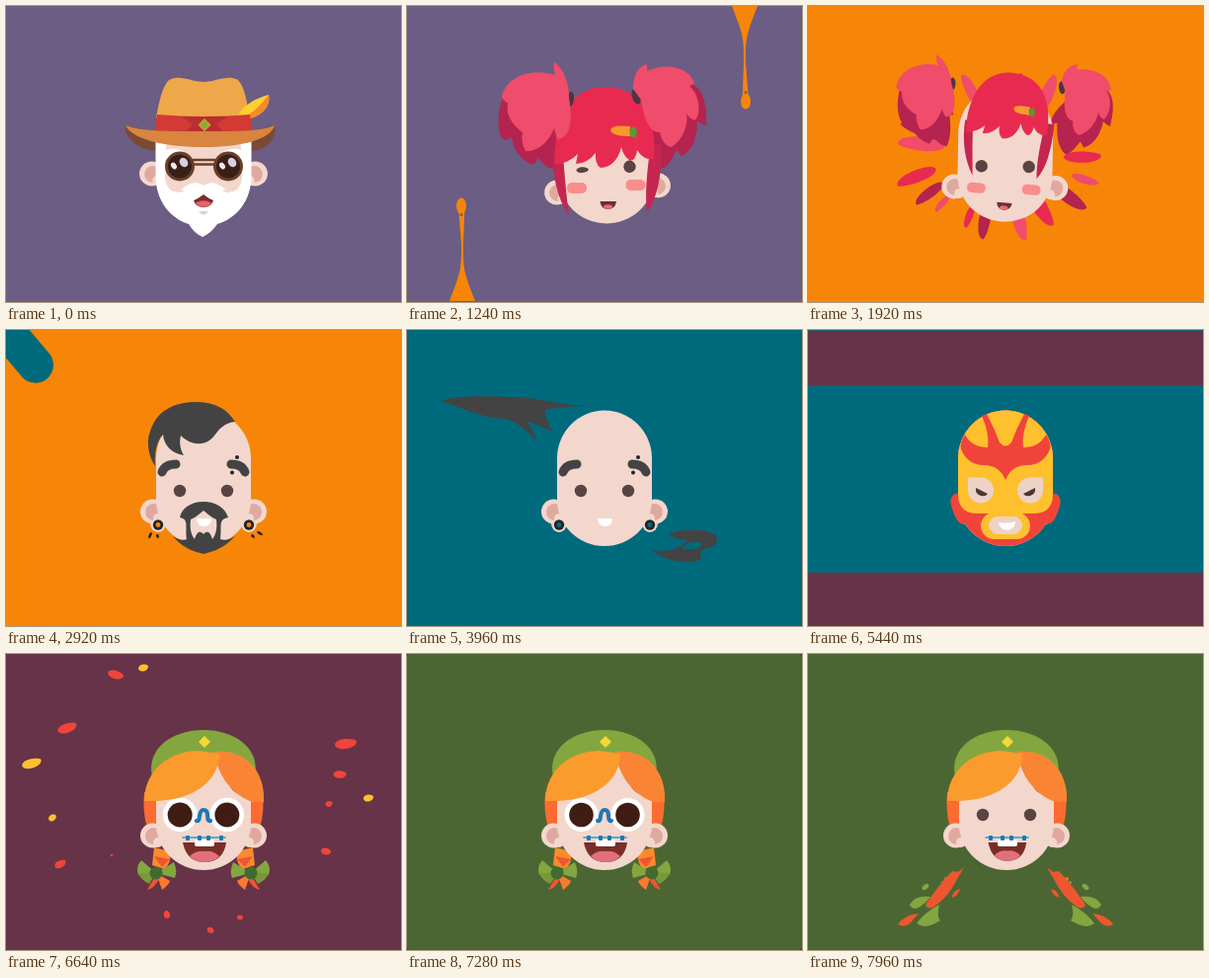
Animation, 400 px wide and 300 px high, one loop 8 s. Source, as an HTML page:

```html
<!DOCTYPE html>
<html lang="en">
<head>
<meta charset="utf-8">
<title>Faces</title>
<style>
html, body { margin: 0; width: 100%; height: 100%; overflow: hidden; background: #6b5d83; }
svg { display: block; width: 100vw; height: 100vh; }
</style>
</head>
<body>
<svg id="stage" viewBox="0 0 400 300"></svg>
<script>
const LOOP = 8000;
const stage = document.getElementById('stage');
const C = {
  purple: '#6b5d83', orange: '#f78508', teal: '#006a7d', maroon: '#663348', green: '#4c6633',
  skin: '#f3d7cd', ear: '#e0a9a0', eye: '#594343', hair: '#434343'
};

// Easing
const clamp = k => Math.max(0, Math.min(1, k));
const span = (t, a, b) => clamp((t - a) / (b - a));
const easeOut = k => 1 - (1 - k) ** 3;
const smooth = k => k * k * (3 - 2 * k);
const back = k => 1 + 2.4 * (k - 1) ** 3 + 1.4 * (k - 1) ** 2;
function keyed(t, keys) {
  let i = 1;
  while (i < keys.length - 1 && t > keys[i][0]) i++;
  const [a, u] = keys[i - 1], [b, v] = keys[i];
  return u + (v - u) * smooth(span(t, a, b));
}

// Markup helpers
const path = (d, fill, more = '') => `<path d="${d}" fill="${fill}" ${more}/>`;
const oval = (x, y, rx, ry, fill, more = '') =>
  `<ellipse cx="${x}" cy="${y}" rx="${rx}" ry="${ry}" fill="${fill}" ${more}/>`;
const dot = (x, y, r, fill, more) => oval(x, y, r, r, fill, more);
const box = (x, y, w, h, r, fill) => `<rect x="${x}" y="${y}" width="${w}" height="${h}" rx="${r}" fill="${fill}"/>`;
const line = (d, color, w) => path(d, 'none', `stroke="${color}" stroke-width="${w}" stroke-linecap="round"`);
const flip = s => `<g transform="matrix(-1 0 0 1 400 0)">${s}</g>`;
const both = s => s + flip(s);
const tilted = s => `<g transform="rotate(4 200 155) translate(-1 -1.5)">${s}</g>`;
const headShape = 'M152 130A48 48.5 0 0 1 248 130V172A48 47 0 0 1 152 172Z';

function morph(a, b, k) {
  const to = b.match(/-?[\d.]+/g);
  let i = 0;
  return a.replace(/-?[\d.]+/g, n => (+n + (to[i++] - n) * k).toFixed(1));
}

const hairOn = 'M151 138C144 128 142 112 146 103C152 82 170 73 192 73C212 73 224 80 232 93C222 94 217 99 211 107C203 118 188 118 177 107C175 115 177 122 180 127C168 125 160 117 159 106C153 112 150 124 151 138Z';
const hairOff = 'M34 72C50 66 80 67 105 68C140 68 162 80 187 75C172 79 150 78 140 81C141 90 144 96 148 103C138 99 130 95 122 93C126 99 130 106 132 113C122 102 112 94 100 90C75 90 50 76 34 72Z';
const beardOn = 'M176 190C178 180 188 174 200 174C212 174 222 180 225 190C214 192 219 200 217 212C222 214 227 212 232 209C222 220 212 224 200 227C188 224 178 220 169 209C174 212 179 214 183 212C181 200 186 192 176 190ZM187 192C192 190 196 186 200 183C204 186 208 190 213 192C214 200 213 207 209 212C206 203 203 204 200 207C197 204 194 203 191 212C187 207 186 200 187 192Z';
const beardOff = 'M264 207C272 203 282 202 292 203C304 202 314 207 314 212C314 218 308 222 299 222C296 225 298 229 297 233C288 236 276 236 268 233C260 231 252 228 247 222C258 226 276 224 284 212C277 213 270 211 264 207ZM280 219C284 216 288 215 292 215C296 214 299 216 298 218C296 221 293 222 290 222C287 222 285 222 283 222C281 222 280 222 279 221C279 220 279 220 280 219Z';

// Parts: layer, start, end, anchor x/y, exit offset x/y, markup
const parts = [];
const part = (layer, from, to, x, y, dx, dy, svg) => parts.push({ layer, from, to, x, y, dx, dy, svg });

// Old man
part('back', -999, 120, 200, 130, -50, -100,
  path('M121 121C119 134 136 147 154 147H246C264 147 275 134 272 121Q200 140 121 121Z', '#7a4a36'));
part('front', -999, 140, 200, 200, 30, 110,
  path('M151.500 134H163C161 150 161 165 161 175C163 188 172 192 180 184C187 178 195 178 200 182C205 178 213 178 220 184C228 192 237 188 239 175C239 165 239 150 237 134H248.500V172C248.500 197 234 215 214 221Q208 230 199 234Q190 230 185 221C166 215 151.500 197 151.500 172Z', '#fff') +
  both(path('M156 154C157 144 172 142 182 149Q169 151 157 157Z', '#fff')) +
  both(line('M170 184Q172 190 179 187', C.skin, 2)) +
  path('M190 197Q195 195 200 191Q205 195 210 197Q208 204 200 204Q192 204 190 197Z', '#7a2e2a') +
  path('M192 199.500Q200 195 208 199.500Q206 203.500 200 203.500Q194 203.500 192 199.500Z', '#e8606a') +
  path('M195 208H205Q200 215 195 208Z', '#d5d3da'));
part('front', -999, 100, 200, 163, 110, 10,
  line('M189 156H212M190 160.5H211', '#6b3f2a', 2.7) +
  [176, 225].map(x => dot(x, 162.5, 15, '#6b3f2a') + dot(x, 162.5, 12, '#3a1f18') +
    oval(x + 4, 158.5, 4, 5, '#d8cfdd', `transform="rotate(-35 ${x + 4} 158.5)"`) +
    oval(x - 6, 162, 2.6, 3.6, '#eee8f0', `transform="rotate(-35 ${x - 6} 162)"`)).join(''));
part('front', -999, 120, 200, 120, -50, -100,
  path('M152 114C155 97 158 82 165 75C176 69 188 77 200 77C212 77 224 69 235 75C242 82 244 98 247 114Z', '#eea849') +
  path('M234 113C240 100 252 94 266 90C268 99 262 110 248 113Z', '#ffcf30') +
  path('M237 113C250 110 257 101 266 90C268 99 262 110 248 114Z', '#f58a2a') +
  path('M153 110Q200 114 247 110L250 129Q200 130 150 129Z', '#d23a33') +
  path('M178 112H224L213 120L222 129H180L189 120Z', '#b82e33') +
  path('M121 121C140 128 170 127 200 127C230 127 255 128 272 121C268 136 236 143 200 143C164 143 128 136 121 121Z', '#d9843f') +
  path('M201 114L207.500 120.500L201 127L194.500 120.500Z', '#c8a436') + path('M201 116L205.500 120.500L201 125L196.500 120.500Z', '#7fae35'));

// Pink-haired girl
part('back', 600, 1820, 163, 100, -110, -70, tilted(
  path('M98 90C90 110 92 128 97 135Q101 137 106 133C108 148 118 158 128 161L133 154Q140 164 148 165Q156 150 152 120Z', '#b5234f')));
part('back', 600, 1820, 233, 96, 110, -70, tilted(
  path('M286 78C300 82 304 100 303 121Q298 120 294 117C294 135 288 147 278 152L273 146C268 155 264 164 259 164Q244 158 240 118Z', '#b5234f')));
part('front', 560, 1860, 200, 185, 0, 60, tilted(
  box(162, 179, 20, 11, 5, '#f98d8d') + box(221.5, 176, 20, 11, 5, '#f98d8d') +
  path('M195.500 198H212Q211 206 203 206Q196 205 195.500 198Z', '#6b2f36') + oval(203.5, 203.5, 4.5, 2.2, '#ee6b66')));
part('front', 540, 1800, 200, 120, 10, -110, tilted(
  path('M148 145Q146 185 164 213Q160 180 158 150Z', '#c4264f') + path('M247 140Q240 185 243 209Q258 190 258 140Z', '#c4264f') +
  path('M150 160C148 110 168 82 200 82C234 82 254 108 250 155Q240 157 233 146Q232 156 226 157Q219 152 217 143Q212 163 196 164Q190 160 191 149Q182 160 171 160Q172 155 173 150Q163 160 150 160Z', '#e82a50') +
  path('M226 122Q206 120 206 126Q208 132 226 132Z', '#f9992c') + path('M225 125L230 122L233 126L232 134L226 132Z', '#5f9630')));
part('front', 620, 1800, 163, 95, -120, -60, tilted(
  oval(165, 95, 4, 8, '#4c3540', 'transform="rotate(10 165 95)"') +
  path('M149 57C158 62 165 80 164 93C168 115 166 133 153 135Q150 130 149 124C143 140 130 148 120 147Q115 138 117 128C106 120 100 110 102 98Q97 96 96 92C100 72 125 62 150 70Q148 62 149 57Z', '#f04c6b')));
part('front', 620, 1800, 233, 92, 120, -60, tilted(
  oval(232, 92, 4, 8, '#4c3540', 'transform="rotate(-20 232 92)"') +
  path('M229 84C229 70 234 61 243 59L243 66C265 56 288 64 291 79L286 81C298 92 297 110 292 116Q284 113 283 108C286 125 274 141 267 143Q258 140 256 128C244 128 240 112 237 95Z', '#f04c6b')));

// Pierced man
part('back', 2340, 4180, 200, 184, 0, 0, both(oval(154, 196, 8, 9, C.skin)));
part('front', 2340, 4180, 200, 160, 0, 40,
  both(line('M158 144Q161 136 172 136', C.hair, 9)) +
  path('M193 191H208Q208 199 200 199Q193 198 193 191Z', '#fff') +
  dot(234, 129, 2, '#222') + dot(229, 144.5, 2, '#222') +
  both(dot(154, 197.5, 5.2, '#252525') + dot(154, 197.5, 2.4, 'none', 'class="plug"')));
part('front', 2300, 9999, 190, 110, 0, 0, path(hairOn, C.hair, 'id="hair"'));
part('front', 2380, 9999, 200, 200, 0, 0, path(beardOn, C.hair, 'id="beard" fill-rule="evenodd"'));

// Wrestler
part('front', 4260, 5940, 200, 150, 0, 0,
  path(headShape, '#f0443a') +
  path('M153 166C146 164 143 172 145 178Q149 192 154 196H246Q251 192 255 178C257 172 254 164 247 166Z', '#f0443a') +
  path('M152 130A48 48.500 0 0 1 248 130V168Q247 186 228 186H172Q153 186 152 168Z', '#ffc02e') +
  box(175, 185, 50, 27, 13.5, '#ffc02e') +
  path('M159 106Q166 119 182 119Q184 105 176 87L181 85Q189 100 194 114Q200 121 206 114Q211 100 219 85L224 87Q216 105 218 119Q234 119 241 106Q247 115 245 121Q238 137 222 137Q206 137 200 152Q194 137 178 137Q162 137 155 121Q153 115 159 106Z', '#f0443a') +
  both(path('M162 149.500H175A13 13 0 1 1 162 162.500Z', '#ecd2c7') +
    path('M170 160L182 166Q180 169 175 168Q169 166 170 160Z', '#4f3535')) +
  box(183, 189, 34, 18, 9, '#ecd2c7') + path('M193 195Q201 197 210 194Q210 202 202 203Q194 202 193 195Z', '#fff'));

// Girl with braces
part('back', 6240, 7640, 154, 205, -20, 30,
  path('M150 196L166 200Q168 212 160 218L148 214Z', '#fb8a2d') + path('M150 205L166 208L158 216Z', '#ee5630') +
  path('M153 222L143 239Q150 238 155 228Z', '#ee5630') + path('M152 222L158 239Q165 234 166 230Z', '#fb7a2d') +
  path('M152 222L137 209Q131 216 134 224Z', '#83a63f') + path('M152 222L170 211Q174 220 171 227Z', '#83a63f') +
  path('M152 222L134 222Q136 229 145 233Z', '#78983a') + dot(152, 222, 6.5, '#3f6b30'));
const braid = parts[parts.length - 1];
parts.push({ ...braid, x: 246, dx: 20, svg: flip(braid.svg) });
part('back', 6140, 9999, 200, 110, 0, 0, both(path('M140 140H154V176H143Q138 160 140 140Z', '#fd6b30')));
part('front', 6180, 9999, 200, 195, 0, 0,
  both(path('M161 140Q164 130 172 128Q175 132 172 136Q166 144 161 140Z', '#d0332b')) +
  `<g id="mouth">${path('M179 191H223Q220 211 201 211Q183 211 179 191Z', '#7a2e2a')}
  ${path('M186 205Q192 199 201 200Q210 199 216 205Q210 211 201 211Q192 211 186 205Z', '#e2707a')}</g>` +
  box(191, 188, 20, 7, 2, '#fff') + line('M179 186H222', '#2a9bd0', 1.6) +
  [182, 194, 203, 216].map(x => box(x, 184, 4, 5, 1, '#1d77b8')).join(''));
part('front', 6340, 7360, 200, 163, 0, 0,
  both(dot(176.5, 163, 17, '#fff') + dot(176.5, 163, 12.3, '#3f1d14')) +
  line('M193 169Q196 170 196 164Q197 158 200 158Q204 158 204 164Q204 170 207 169', '#1d77b8', 4));
part('front', 6100, 9999, 200, 120, 0, 0,
  path('M148 124C142 96 168 77 200 77C232 77 258 96 252 124C240 93 160 93 148 124Z', '#83a63f') +
  path('M211 99C240 96 259 115 261 142V150H249C232 143 215 128 211 99Z', '#f98534') +
  path('M140 149C140 122 160 99 195 98L216 101C216 130 188 148 152 149Z', '#fb9a2d') +
  path('M201 83L207 89L201 95L195 89Z', '#f5d836'));

// Stage
const earSvg = both(dot(148.5, 184, 12.5, C.skin) + dot(149.5, 184.5, 8.5, C.ear) + dot(154, 191, 5, C.skin));
const tails =
  path('M158 216L152 221L146 220Q134 232 119 254Q121 260 128 256Q142 246 150 230Z', '#ee5630') +
  path('M154 238Q146 240 146 247Q152 245 154 238Z', '#ee5630') +
  path('M112 263Q98 264 91 274Q97 278 103 273Z', '#ee5630') +
  path('M124 246Q108 244 103 254Q106 260 112 257Q120 252 124 246Z', '#83a63f') +
  path('M133 254Q118 262 110 273Q118 280 134 270Q130 266 133 254Z', '#83a63f') +
  oval(119, 236, 4, 2.4, '#83a63f', 'transform="rotate(-40 119 236)"');
const layer = name => parts.map((p, i) => p.layer === name ? `<g id="p${i}">${p.svg}</g>` : '').join('');

stage.innerHTML = `<rect id="bg" width="400" height="300"/><g id="wipe"></g><g id="bits"></g>
<g id="head">${layer('back')}<g id="ears">${earSvg}</g>${path(headShape, C.skin)}
${oval(176, 163, 6.2, 6.2, C.eye, 'id="eyeL"')}${oval(224, 163, 6.2, 6.2, C.eye, 'id="eyeR"')}${layer('front')}</g>
<g class="tail">${tails}</g><g transform="matrix(-1 0 0 1 400 0)"><g class="tail">${tails}</g></g>`;

const $ = id => document.getElementById(id);
const set = (el, attrs) => { for (const k in attrs) el.setAttribute(k, attrs[k]); };
parts.forEach((p, i) => p.el = $('p' + i));
const [bg, wipe, bits, head, ears, hair, beard, mouth, eyeL, eyeR] =
  ['bg', 'wipe', 'bits', 'head', 'ears', 'hair', 'beard', 'mouth', 'eyeL', 'eyeR'].map($);
const tailEls = [...document.querySelectorAll('.tail')];
const plugs = [...document.querySelectorAll('.plug')];

// Background changes
const bgAt = t => t < 1700 ? C.purple : t < 3440 ? C.orange : t < 5715 ? C.teal : t < 7320 ? C.maroon : C.green;

function wipeAt(t) {
  if (t > 1060 && t < 1700) {
    const y = 105 * easeOut(span(t, 1060, 1240)), u = span(t, 1240, 1700) ** 2;
    const x = 342, w = 13 * span(t, 1060, 1200) + 390 * u, n = 1 + 250 * u, b = 5 + 190 * u;
    const e = y + 140 * u, cy = e - 8.5;
    const drip = path(`M${x - w} 0C${x - n} ${e * .3} ${x - n} ${e * .3} ${x - n} ${e * .55}L${x - n - 1.5} ${cy}H${x + n + 3}L${x + n} ${e * .55}C${x + n} ${e * .3} ${x + n} ${e * .3} ${x + w} 0Z`, C.orange) +
      oval(x + 1, cy, b, b * 1.6, C.orange) + dot(x + 1, cy - 9, 1.5 * (1 - clamp(u * 9)), '#8a5a40');
    return drip + `<g transform="rotate(180 199 149.500)">${drip}</g>`;
  }
  if (t > 2860 && t < 3440) {
    const k = span(t, 2860, 3440), p = k ** 1.38;
    return path('M-17 -20L270 320L110 -30L420 300L330 -30', 'none',
      `pathLength="1" stroke="${C.teal}" stroke-width="${36 + 330 * k ** 3}" stroke-linecap="round" stroke-linejoin="round" stroke-dasharray="${p} 2"`);
  }
  if (t > 5280 && t < 5715) {
    const h = 55 * ((t - 5280) / 160) ** 1.5;
    return box(0, 28.5 - h / 2, 400, h, 0, C.maroon) + box(0, 273.5 - h / 2, 400, h, 0, C.maroon);
  }
  if (t > 6920 && t < 7320) return dot(200, 150, 255 * smooth(span(t, 6920, 7320)), C.green);
  return '';
}

// Flying drops
const rand = n => { const s = Math.sin(n * 127.1 + 3.7) * 43758.545; return s - Math.floor(s); };
const drop = (x, y, r, stretch, turn, fill) => {
  const l = r * stretch;
  return path(`M${-l} ${r * .2}C${-l} ${-r} ${l * .6} ${-r * 1.1} ${l} ${-r * .5}C${l * 1.1} ${r * .9} ${-l * .8} ${r * 1.4} ${-l} ${r * .2}Z`,
    fill, `transform="translate(${x} ${y}) rotate(${turn})"`);
};
function burst(t, a, b, colors) {
  if (t <= a || t >= b) return '';
  const k = span(t, a, b), go = easeOut(k);
  let s = '';
  for (let i = 0; i < 20; i++) {
    const an = (i + rand(i + a) * .8) / 20 * 2 * Math.PI, d = 50 + (50 + 70 * rand(i * 3 + a)) * go;
    s += drop(200 + Math.cos(an) * d * 1.15, 150 + Math.sin(an) * d * .9, (3 + 6 * rand(i + 9)) * (1 - k ** 2),
      1.5 + 1.5 * (1 - k), an * 180 / Math.PI, colors[i % colors.length]);
  }
  return s;
}
// x, y, half length, turn, yellow
const shards = [
  [111, 21, 8, 25, 0], [139, 14, 5, 0, 1], [62, 75, 10, -12, 0], [26, 111, 10, -8, 1], [47, 166, 4, -10, 1],
  [55, 213, 6, -15, 0], [107, 204, 1.5, 0, 0], [163, 264, 4, -75, 0], [207, 280, 3.5, 60, 0], [237, 267, 3, 40, 0],
  [324, 200, 5, 25, 0], [327, 152, 3.5, 10, 0], [338, 122, 6.5, 10, 0], [344, 91, 11, 0, 0], [367, 146, 5, 5, 1]
];
function maskBits(t) {
  if (t < 5940 || t > 7120) return '';
  const k = .3 + .7 * easeOut(span(t, 5940, 6700)) / easeOut(700 / 760);
  const size = (1 + 2 * (1 - span(t, 5940, 6640))) * (1 - span(t, 6640, 7120));
  return shards.map(([x, y, l, a, gold]) => {
    const r = Math.min(l, 2.6 + l * .3);
    return drop(200 + (x - 200) * k, 150 + (y - 150) * k, r * size, l / r, a, gold ? '#ffc02e' : '#f0443a');
  }).join('');
}
function earDrops(t) {
  if (t < 2720 || t > 3060) return '';
  const k = (t - 2920) / 200, s = 1 - Math.abs(k) * .8;
  return [[146, 208, 3.4, 120], [153.5, 209, 2, 80], [250, 209, 2.2, 60], [257, 206, 3.2, 35]].map(([x, y, l, a]) =>
    drop(x + (x < 200 ? -6 : 6) * k, y + 6 * k, 1.6 * s, l / 1.6, a, '#252525')).join('');
}

function pose(p, t) {
  const on = t >= p.from && t < p.to + 380;
  p.el.style.display = on ? '' : 'none';
  if (!on) return;
  const enter = back(span(t, p.from, p.from + 340)), leave = span(t, p.to, p.to + 380) ** 1.5;
  const s = Math.max(0, enter) * (1 - leave), turn = leave * p.dx * .5;
  set(p.el, { transform: `translate(${p.x + p.dx * leave} ${p.y + p.dy * leave}) rotate(${turn}) scale(${s}) translate(${-p.x} ${-p.y})` });
}

function fling(el, t, on, off, x, y, dx, dy) {
  const end = span(t, 3960, 4230), s = 1 - end;
  set(el, {
    d: morph(on, off, easeOut(span(t, 3660, 3960))),
    transform: `translate(${x + dx * end} ${y + dy * end}) scale(${s}) translate(${-x} ${-y})`
  });
}

function draw(t) {
  const color = bgAt(t);
  set(bg, { fill: color });
  wipe.innerHTML = wipeAt(t);
  bits.innerHTML = burst(t, 160, 840, ['#eea849', '#fff', '#d23a33', '#7a4a36']) +
    burst(t, 1860, 2460, ['#e82a50', '#f04c6b', '#b5234f']) + maskBits(t) + earDrops(t);

  const tilt = keyed(t, [[0, 0], [560, 0], [900, -6], [1240, -4], [1600, 3], [2100, 0], [8000, 0]]);
  const lean = tilt / -4;
  set(head, { transform: `translate(${lean + span(t, 7400, 7700)} ${lean * 1.5}) rotate(${tilt} 200 155)` });

  // Ears rise under the hat and tuck in under the mask
  const rise = 1 - smooth(span(t, 160, 560));
  const tuck = smooth(span(t, 4260, 4560)) * (1 - smooth(span(t, 5960, 6240)));
  set(ears, { transform: `translate(${200 * (.2 * tuck - .015 * rise)} ${-14 * rise}) scale(${1 - .2 * tuck + .015 * rise} 1)` });

  const wink = smooth(span(t, 1100, 1200)) * (1 - smooth(span(t, 1440, 1560)));
  const blink = [2640, 3500, 5000, 7600].reduce((m, b) => Math.min(m, Math.abs(t - b) / 80), 1);
  const open = .1 + .9 * blink;
  set(eyeL, { ry: 6.2 * open * (1 - .55 * wink) });
  set(eyeR, { ry: 6.2 * open });

  parts.forEach(p => pose(p, t));
  fling(hair, t, hairOn, hairOff, 90, 80, -50, -10);
  fling(beard, t, beardOn, beardOff, 285, 220, 50, 12);
  plugs.forEach(el => set(el, { fill: color }));
  const m = 1 - .12 * span(t, 7300, 7600);
  set(mouth, { transform: `translate(200 191) scale(${m} ${m * .5 + .5}) translate(-200 -191)` });

  const fly = easeOut(span(t, 7660, 7960));
  tailEls.forEach(el => {
    el.style.display = fly ? '' : 'none';
    set(el, { transform: `translate(156 212) scale(${fly}) translate(-156 -212)` });
  });
}

function tick() {
  draw(performance.now() % LOOP);
  requestAnimationFrame(tick);
}
tick();
</script>
</body>
</html>
```
